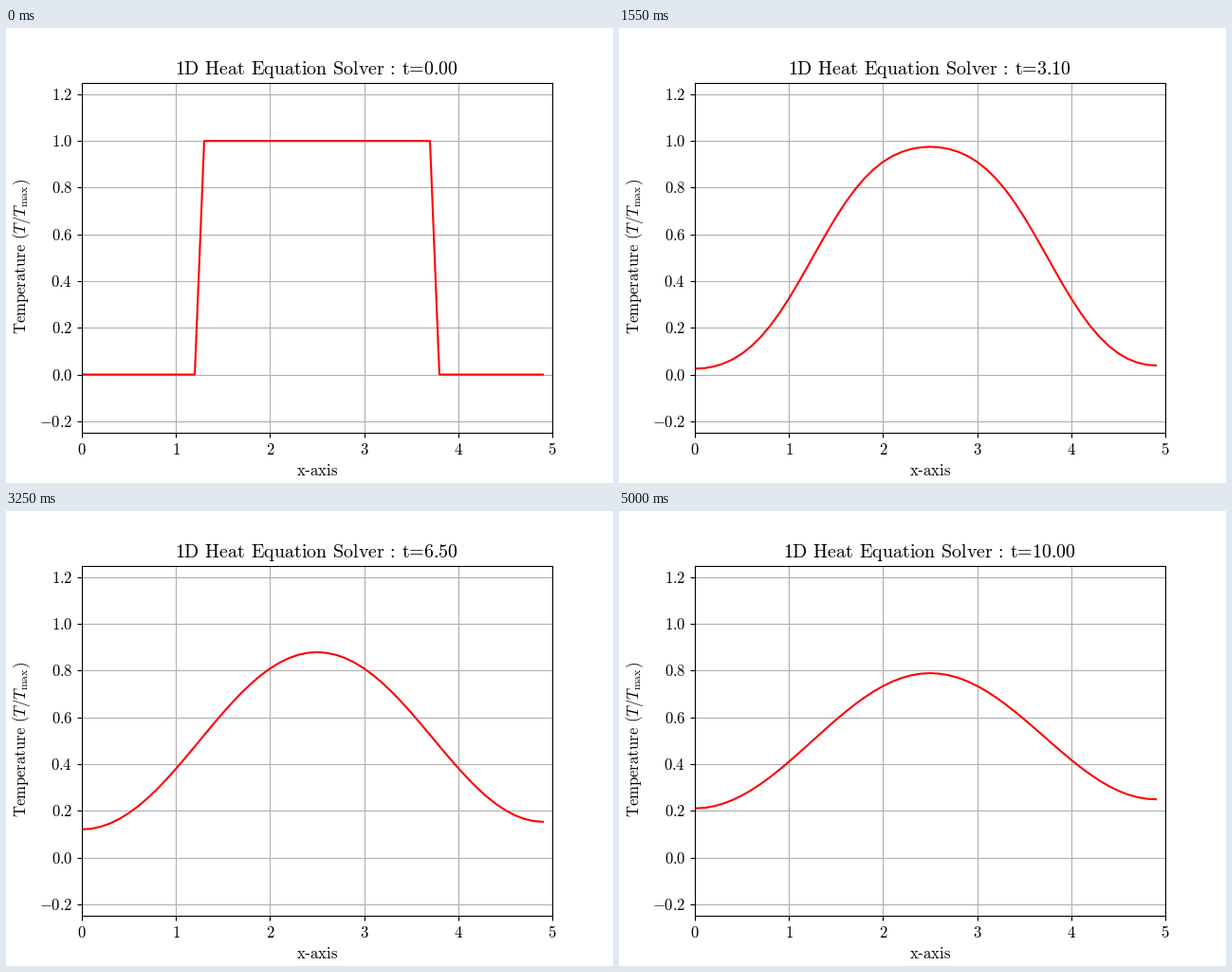
These frames come from a looping animation (640 by 480 pixels, 5050 ms). A matplotlib script:

```python
import numpy as np
import matplotlib.pyplot as plt
from matplotlib.animation import FuncAnimation

W, H, DPI = 640, 480, 100
FRAMES, INTERVAL = 101, 50
DT = 0.1            # simulated time per frame
ALPHA, DX, N = 0.05, 0.1, 50

plt.rcParams.update({
    "font.family": "Liberation Serif",
    "font.size": 12,
    "mathtext.fontset": "cm",
})

# Heat equation on a grid with insulated ends, solved in cosine modes
j = np.arange(N)
x = j * DX
start = ((j >= 13) & (j <= 37)).astype(float)
modes = np.cos(np.pi * np.outer(j, j) / (N - 1))
weights = np.linalg.solve(modes, start)
rates = 4 * ALPHA / DX**2 * np.sin(np.pi * j / (2 * (N - 1)))**2


def temperature(t):
    return modes @ (weights * np.exp(-rates * t))


def title_at(t):
    return rf"$\text{{1D Heat Equation Solver : t={t:.2f}}}$"


fig, ax = plt.subplots(figsize=(W / DPI, H / DPI), dpi=DPI)
fig.subplots_adjust(left=0.125, right=0.9, bottom=0.11, top=0.88)


def put(px, py, text, size=12, **kw):
    """Centre text on a baseline point given in pixels from the top left."""
    return fig.text(px / W, 1 - py / H, text, fontsize=size,
                    ha="center", va="baseline", **kw)


ax.set_xlim(0, 5)
ax.set_ylim(-0.25, 1.25)
xticks = np.arange(6)
yticks = np.arange(-1, 7) / 5
ax.set_xticks(xticks, [rf"$\mathrm{{{v}}}$" for v in xticks])
ax.set_yticks(yticks, [rf"$\mathrm{{{v:.1f}}}$" for v in yticks])
ax.tick_params(axis="x", pad=12.8)
for label in ax.get_xticklabels():
    label.set_va("baseline")
ax.grid(True)

title = put(328, 48.6, title_at(0), size=14.4)
put(328, 472, "$\\text{x\u2010axis}$")
put(21.5, 241.5, r"$\text{Temperature }(T/T_\mathrm{max})$",
    rotation=90, rotation_mode="anchor")

line, = ax.plot(x, start, color="red", lw=1.5)


def update(i):
    t = i * DT
    line.set_ydata(temperature(t))
    title.set_text(title_at(t))
    return line, title


anim = FuncAnimation(fig, update, frames=FRAMES, interval=INTERVAL,
                     repeat=True, repeat_delay=0, blit=False)
plt.show()
```
